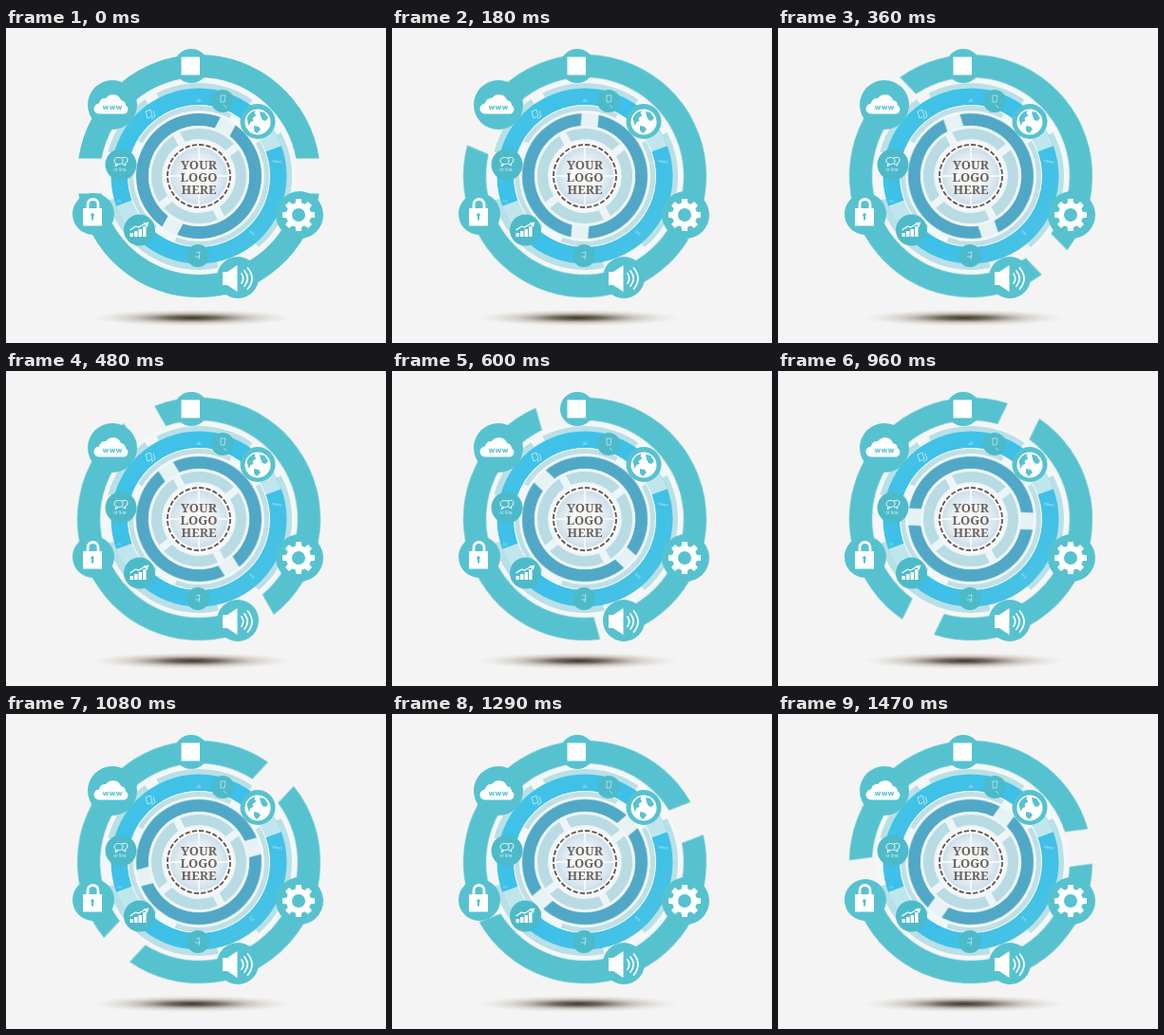
An HTML page that plays this animation: 400x332 px, repeating every 1500 ms.

```html
<!DOCTYPE html>
<html lang="en">
<head>
<meta charset="utf-8">
<title>Rotating ring diagram</title>
<style>
  html, body { margin: 0; width: 100%; height: 100%; overflow: hidden; background: #f4f4f4; }
  svg { display: block; width: 400px; height: 332px; }
  .spin { animation: spin 1500ms infinite; }
  #outer { --dir: 1; }
  #inner { --dir: -1; }
  /* one 30 ms tick per step, slightly uneven speed */
  @keyframes spin {
    0%   { transform: rotate(0deg); animation-timing-function: steps(12); }
    24%  { transform: rotate(calc(var(--dir) * 46deg)); animation-timing-function: steps(8); }
    40%  { transform: rotate(calc(var(--dir) * 74.5deg)); animation-timing-function: steps(7); }
    54%  { transform: rotate(calc(var(--dir) * 94.7deg)); animation-timing-function: steps(9); }
    72%  { transform: rotate(calc(var(--dir) * 133deg)); animation-timing-function: steps(7); }
    86%  { transform: rotate(calc(var(--dir) * 158.7deg)); animation-timing-function: steps(6); }
    98%  { transform: rotate(calc(var(--dir) * 172.5deg)); animation-timing-function: steps(1); }
    100% { transform: rotate(calc(var(--dir) * 180deg)); }
  }
  .logo { font: bold 13px "Noto Serif", serif; fill: #6a625d; text-anchor: middle; }
  .www { font: bold 7.5px "DejaVu Sans", sans-serif; fill: #57c2cf; text-anchor: middle; }
  .tiny { font: 4.5px "Open Sans", sans-serif; fill: #c4ecf5; text-anchor: middle; }
  .line { fill: none; stroke: #fff; }
</style>
</head>
<body>
<svg viewBox="0 0 400 332">
  <defs>
    <radialGradient id="shade">
      <stop offset="0" stop-color="#40362d"/>
      <stop offset=".25" stop-color="#5f5347" stop-opacity=".85"/>
      <stop offset=".55" stop-color="#9c8d7c" stop-opacity=".45"/>
      <stop offset="1" stop-color="#d8d0c4" stop-opacity="0"/>
    </radialGradient>
    <radialGradient id="core" gradientUnits="userSpaceOnUse" cx="0" cy="0" r="32">
      <stop offset=".4" stop-color="#f5f8fa"/>
      <stop offset=".75" stop-color="#dae7f0"/>
      <stop offset="1" stop-color="#c6dbe9"/>
    </radialGradient>
    <linearGradient id="sky" x1="0" y1="0" x2="1" y2="1">
      <stop offset="0" stop-color="#43c3e6"/>
      <stop offset=".5" stop-color="#3bbfea"/>
      <stop offset="1" stop-color="#49c3e3"/>
    </linearGradient>
  </defs>

  <rect width="400" height="332" fill="#f4f4f4"/>
  <ellipse cx="196" cy="305.500" rx="108" ry="9" fill="url(#shade)"/>

  <g transform="translate(203 156)">
    <circle r="102" fill="#f4f7f7"/>
    <g id="outer" class="spin" fill="#57c2cf"></g>
    <g id="pale" fill="#b9e0e6"></g>
    <circle r="83.500" fill="none" stroke="url(#sky)" stroke-width="18"/>
    <g id="notches" fill="#bfe6ed"></g>
    <circle r="75" fill="#f1f8f9"/>
    <g id="rim" fill="#bfdfe6"></g>
    <circle r="66" fill="#e6f2f4"/>
    <g id="inner" class="spin" fill="#51a8c6"></g>
    <circle r="53" fill="#edf5f7"/>
    <g id="light" fill="#b9dbe3"></g>
    <circle r="37" fill="#f7f8f8"/>
    <g id="disc" fill="url(#core)"></g>
    <circle r="33" fill="none" stroke="#5e5650" stroke-width="1.8" stroke-dasharray="5.2 2.2"/>
  </g>

  <g class="logo">
    <text x="203" y="149">YOUR</text>
    <text x="203" y="162">LOGO</text>
    <text x="203" y="175">HERE</text>
  </g>

  <g class="tiny">
    <text transform="translate(203 78) rotate(-8)">ab</text>
    <text transform="translate(285 142) rotate(8)">news</text>
    <text transform="translate(119 184) rotate(10)">in</text>
    <text transform="translate(258 217) rotate(40)">list</text>
  </g>
  <path class="line" d="M147 88l5-2 2 7-5 2zM155 87l2 6-4 3" stroke-width=".8" opacity=".75"/>

  <g fill="#57c2cf">
    <circle cx="195" cy="40" r="18"/>
    <circle cx="112" cy="81" r="26"/>
    <circle cx="92" cy="196" r="22"/>
    <circle cx="309" cy="197" r="25"/>
    <circle cx="244" cy="263" r="22"/>
    <circle cx="265" cy="98.500" r="18.500"/>
  </g>
  <g fill="#4dbaca">
    <circle cx="140.500" cy="213" r="16.500"/>
    <circle cx="121" cy="144" r="16.500"/>
    <circle cx="228" cy="77" r="12"/>
    <circle cx="202" cy="240" r="12"/>
  </g>

  <rect x="184.500" y="30.500" width="19.500" height="19" fill="#fff"/>

  <g fill="#fff">
    <path d="M99 90.500a6 5.500 0 0 1-1-11a6 6 0 0 1 7-5.500a9 8.500 0 0 1 16 2a6 6 0 0 1 5 5.500a5 5 0 0 1-1 9z"/>
    <path d="M81 190h20v18.500h-20z"/>
    <path class="line" d="M86 191v-5a5.500 5.500 0 0 1 11 0v5" stroke-width="2.800"/>
    <path d="M228 257h5l10.500-7v28l-10.500-7h-5z"/>
  </g>
  <text class="www" x="112" y="86">www</text>
  <path d="M91 195a2 2 0 0 1 1 3.600v4h-2v-4a2 2 0 0 1 1-3.600z" fill="#57c2cf"/>

  <path class="line" d="M248 259q3.500 5 0 10M251 256q6.500 8 0 16M254.500 253q9 11 0 22" stroke-width="1.700" stroke-linecap="round"/>

  <g id="gear" transform="translate(308 197)" fill="#fff">
    <circle r="10" class="line" stroke-width="6"/>
  </g>

  <circle cx="265" cy="99" r="13.500" fill="#fff"/>
  <g fill="#57c2cf">
    <path d="M253.500 95q3-7 9-8l-1 3 2 2-4 3 1 3-3 1-2 4z"/>
    <path d="M267 88l5 1 4 6-3 3-3-1-2-4zM261 103l5 1 2 3-4 4-3-3z"/>
  </g>

  <g fill="#fff">
    <path d="M130.500 216h3.500v4h-3.500zM135 214h3.500v6h-3.500zM139.500 212h3.500v8h-3.500zM144 209h3.500v11h-3.500z"/>
    <path d="M144.500 205.500l6-1-2 5.500z"/>
  </g>
  <path class="line" d="M130.500 213l6-4 3 1 8-4.500" stroke-width="1.300"/>

  <g class="line" stroke-width=".9">
    <ellipse cx="118.500" cy="140" rx="4.500" ry="3.500"/>
    <path d="M122 137q6-2 6 2q0 3-3 4l1 2-4-2M116 143l-1 3 3-2"/>
  </g>
  <text class="tiny" x="120" y="151" style="fill:#e8f8fa">or line</text>
  <path class="line" d="M226 71h5l-1 7h-4zM229 81l3 3M200 237l4-1-1 8M199 241h5" stroke-width=".8" opacity=".65"/>
</svg>

<script>
  const NS = "http://www.w3.org/2000/svg";
  const rad = Math.PI / 180;
  const $ = id => document.getElementById(id);

  function add(id, d, transform) {
    const p = document.createElementNS(NS, "path");
    p.setAttribute("d", d);
    if (transform) p.setAttribute("transform", transform);
    $(id).append(p);
  }

  const at = (r, a) => `${(r * Math.cos(a)).toFixed(2)} ${(r * Math.sin(a)).toFixed(2)}`;

  // Ring piece from a0 to a1 degrees, ends trimmed by straight bars of half width h
  function arc(id, r, R, a0, a1, h = 0) {
    const cut = q => Math.asin(h / q);
    const s = a0 * rad, e = a1 * rad;
    const big = a1 - a0 - 2 * cut(r) / rad > 180 ? 1 : 0;
    add(id, `M${at(R, s + cut(R))}A${R} ${R} 0 ${big} 1 ${at(R, e - cut(R))}` +
            `L${at(r, e - cut(r))}A${r} ${r} 0 ${big} 0 ${at(r, s + cut(r))}Z`);
  }

  const ring = (id, r, R, gaps, h) =>
    gaps.forEach((a, i) => arc(id, r, R, a, gaps[i + 1] ?? gaps[0] + 360, h));

  ring("outer", 104, 128, [0, 180], 18.5);
  ring("inner", 53, 66, [-62, 118], 9);
  ring("light", 39, 50, [-118, -38, 62, 142], 4);
  ring("disc", 14, 30, [-90, 0, 90, 180], 1);

  arc("pale", 92, 99, -165, -125);
  arc("pale", 92, 98, -117, -55);
  arc("pale", 92, 98, -28, 50);
  arc("pale", 92, 99, 78, 165);
  arc("notches", 74.5, 92.5, -44, -20);
  arc("notches", 74.5, 92.5, 142, 160);
  arc("rim", 69, 74, -150, -62);
  arc("rim", 69, 74, -30, 110);
  arc("rim", 69, 74, 130, 195);

  for (let a = 0; a < 360; a += 45)
    add("gear", "M-3.500-11L-2.800-17H2.800L3.500-11Z", `rotate(${a})`);
</script>
</body>
</html>
```
